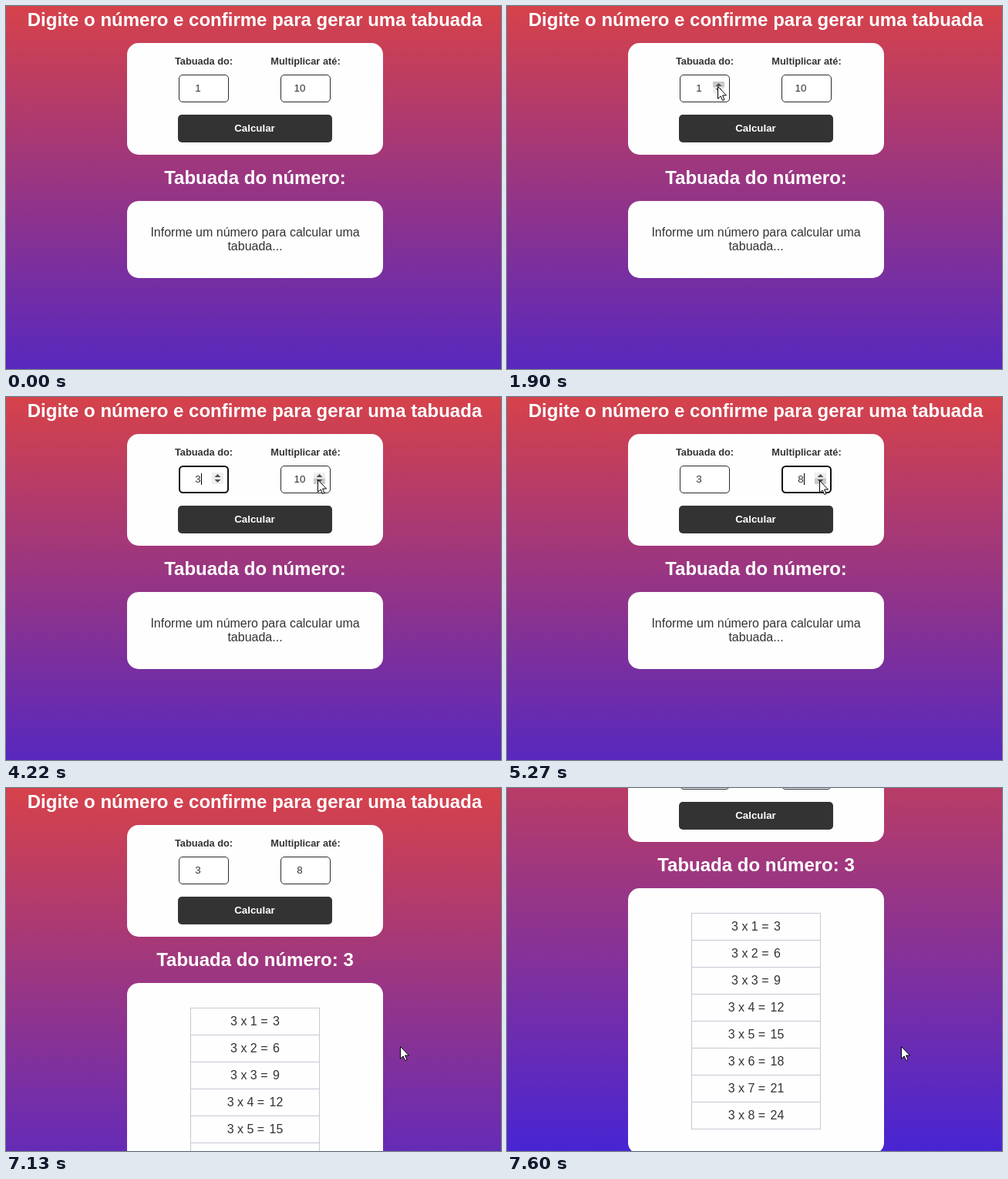
Write an HTML page that moves like this. It is 642 px wide and 471 px high and loops after 8 s.

```html
<!DOCTYPE html>
<html lang="pt-BR">
<head>
<meta charset="utf-8">
<title>Tabuada</title>
<style>
  html, body { margin: 0; width: 100%; height: 100%; overflow: hidden; background: #5828be; }
  svg { display: block; width: 642px; height: 471px; font-family: "Liberation Sans", Arial, sans-serif; }
  text { text-anchor: middle; fill: #333; }
  .title { font-weight: bold; font-size: 24px; fill: #fff; }
  .label { font-weight: bold; font-size: 12.8px; }
  .button { font-weight: bold; font-size: 13.333px; fill: #fff; }
  .value { font-size: 13.333px; }
  .note { font-size: 16px; }
  .card { fill: #fefefe; }
  .field { fill: #fff; stroke: #2b2b33; }
  .focus { stroke: #101010; stroke-width: 2; }
  .lines { fill: none; stroke: #c9c8d4; }
  #click { fill: #ffff5c; mix-blend-mode: multiply; }
</style>
</head>
<body>
<svg xmlns="http://www.w3.org/2000/svg">
  <defs>
    <linearGradient id="short" x1="0" y1="0" x2="0" y2="1">
      <stop stop-color="#d6424a"/><stop offset="1" stop-color="#5828be"/>
    </linearGradient>
    <linearGradient id="long" x1="0" y1="0" x2="0" y2="1">
      <stop stop-color="#d6424a"/><stop offset="1" stop-color="#4825d3"/>
    </linearGradient>
  </defs>
  <g id="page">
    <rect id="back" width="642"/>
    <text class="title" x="322.5" y="26">Digite o número e confirme para gerar uma tabuada</text>
    <rect class="card" x="157" y="48" width="332" height="145" rx="15"/>
    <text class="label" x="256.5" y="76">Tabuada do:</text>
    <text class="label" x="388.5" y="76">Multiplicar até:</text>
    <g id="fields"></g>
    <rect x="223" y="141" width="200" height="36" rx="5" fill="#333"/>
    <text class="button" x="322.5" y="163">Calcular</text>
    <text id="heading" class="title" x="323" y="231"></text>
    <rect id="result" class="card" x="157" y="253" width="332" rx="15"/>
    <g id="note">
      <text class="note" x="323" y="299">Informe um número para calcular uma</text>
      <text class="note" x="323" y="317">tabuada...</text>
    </g>
    <g id="table"></g>
  </g>
  <circle id="click" r="12"/>
  <g id="cursor">
    <path id="arrow" d="M-.5 .5V16.3L3.2 12.9 5.6 18.6 8 17.6 5.6 12H10.5Z" fill="#fff" stroke="#000"/>
    <g id="beam" fill="none">
      <path d="M-3 -7.5H3M0 -7.5V7.5M-3 7.5H3" stroke="#111" stroke-width="2.4"/>
      <path d="M0 -7V7" stroke="#fff" stroke-width=".9"/>
    </g>
    <path id="hand" d="M-1.5 13V1Q-1.5 -.5 0 -.5T1.5 1V7Q4 5.5 5 7.5 7.5 6.5 8 8.5 11 7.5 11 10.5V15Q11 18 9 21.5H0Q-1 18.5-5.5 13.5-6 10.5-3.5 11Z" fill="#fff" stroke="#000"/>
  </g>
</svg>
<script>
const LOOP = 8000, SHOWN = 400, PRESS = 6110, DONE = 6230, HOLD = 110;
const $ = id => document.getElementById(id);
const show = (node, on) => node.setAttribute('visibility', on ? 'visible' : 'hidden');
const between = (v, a, b) => v >= a && v < b;
const clamp = v => Math.min(1, Math.max(0, v));
const easeInOut = k => k * k * (3 - 2 * k);
const easeOut = k => 1 - (1 - k) ** 2;

// pointer moves; bend is the control point of a curved one
const origin = { x: 391, y: 431 };
const moves = [
  { from: 400, to: 1000, x: 228, y: 109, bend: { x: -160, y: 200 } },
  { from: 1000, to: 1500, x: 265, y: 108 },
  { from: 1735, to: 1900, x: 275, y: 103 },
  { from: 3180, to: 3630, x: 399, y: 102 },
  { from: 3800, to: 4350, x: 406, y: 108 },
  { from: 5440, to: 5960, x: 355, y: 154, bend: { x: 360, y: 182 } },
  { from: 6550, to: 6930, x: 512, y: 335 }
];

// each click on a field's spinner adds its step
const fields = [
  { x: 224, first: 1, step: 1, clicks: [2490, 2950], blur: 4550 },
  { x: 356, first: 10, step: -1, clicks: [4550, 5070], blur: PRESS }
];
const clicks = fields.flatMap(f => f.clicks).concat(PRESS);

function pointAt(t) {
  let p = origin;
  for (const m of moves) {
    if (t < m.from) break;
    const k = easeInOut(clamp((t - m.from) / (m.to - m.from)));
    const bend = m.bend || { x: (p.x + m.x) / 2, y: (p.y + m.y) / 2 };
    const mix = axis => (1 - k) ** 2 * p[axis] + 2 * k * (1 - k) * bend[axis] + k * k * m[axis];
    p = { x: mix('x'), y: mix('y') };
  }
  return p;
}

function buildField(f) {
  const g = document.createElementNS('http://www.w3.org/2000/svg', 'g');
  const hotY = f.step > 0 ? 9 : 16.5;
  g.setAttribute('transform', `translate(${f.x} 89)`);
  g.innerHTML = `
    <rect class="field" x=".5" y=".5" width="64" height="35" rx="4.5"/>
    <rect class="field focus" x="1" y="1" width="63" height="34" rx="4.5"/>
    <text class="value" x="25" y="22"></text>
    <path d="M29.5 10V25" stroke="#000"/>
    <g>
      <rect x="43" y="9" width="15" height="15" fill="#efefef"/>
      <rect x="43" y="${hotY}" width="15" height="7.5" fill="#c9c9cb"/>
      <path d="M46.5 15L50.5 11 54.5 15ZM46.5 18H54.5L50.5 22Z" fill="#505050"/>
    </g>`;
  $('fields').append(g);
  [f.box, f.ring, f.text, f.caret, f.spin] = g.children;
  f.hot = f.spin.children[1];
}

function buildTable() {
  let lines = 'M239.5 285V566M406.5 285V566M239 285.5H407', rows = '';
  for (let i = 1; i <= 8; i++) {
    const y = 285.5 + 35 * i;
    lines += `M239 ${y}H407`;
    rows += `<text class="note" x="323" y="${y - 12.5}">3 x ${i} = <tspan dx="2">${3 * i}</tspan></text>`;
  }
  $('table').innerHTML = `<path class="lines" d="${lines}"/>${rows}`;
}

function drawField(f, t, x, y) {
  const past = f.clicks.filter(c => t >= c);
  const focused = past.length > 0 && t < f.blur;
  const over = t >= SHOWN && between(x, f.x + 6, f.x + 65) && between(y, 89, 125);
  f.text.textContent = f.first + f.step * past.length;
  show(f.box, !focused);
  show(f.ring, focused);
  show(f.caret, focused && (t - past[past.length - 1]) % 1000 < 500);
  show(f.spin, focused || over);
  show(f.hot, over && x >= f.x + 43);
}

function draw(t) {
  // the screen refreshes 15 times a second
  const tick = Math.floor((t + 6) * 0.015) / 0.015;
  const { x, y } = pointAt(tick);
  const done = t >= DONE;
  const scroll = Math.round(123 * easeOut(clamp((tick - 7210) / 390)));

  $('page').setAttribute('transform', `translate(0 ${-scroll})`);
  $('back').setAttribute('height', done ? 594 : 471);
  $('back').setAttribute('fill', done ? 'url(#long)' : 'url(#short)');
  $('result').setAttribute('height', done ? 345 : 100);
  $('heading').textContent = 'Tabuada do número:' + (done ? ' 3' : '');
  show($('note'), !done);
  show($('table'), done);
  for (const f of fields) drawField(f, t, x, y);

  const place = `translate(${Math.round(x)} ${Math.round(y)})`;
  $('cursor').setAttribute('transform', place);
  $('click').setAttribute('transform', place);
  show($('click'), clicks.some(c => between(t, c, c + HOLD)));

  const shown = t >= SHOWN;
  const typing = between(y, 89, 125) && fields.some(f => between(x, f.x, f.x + 43));
  const button = between(x, 223, 423) && between(y, 141, 177);
  show($('beam'), shown && typing);
  show($('hand'), shown && button);
  show($('arrow'), shown && !typing && !button);
}

fields.forEach(buildField);
buildTable();
const start = performance.now();
function frame() {
  draw((performance.now() - start) % LOOP);
  requestAnimationFrame(frame);
}
frame();
</script>
</body>
</html>
```
